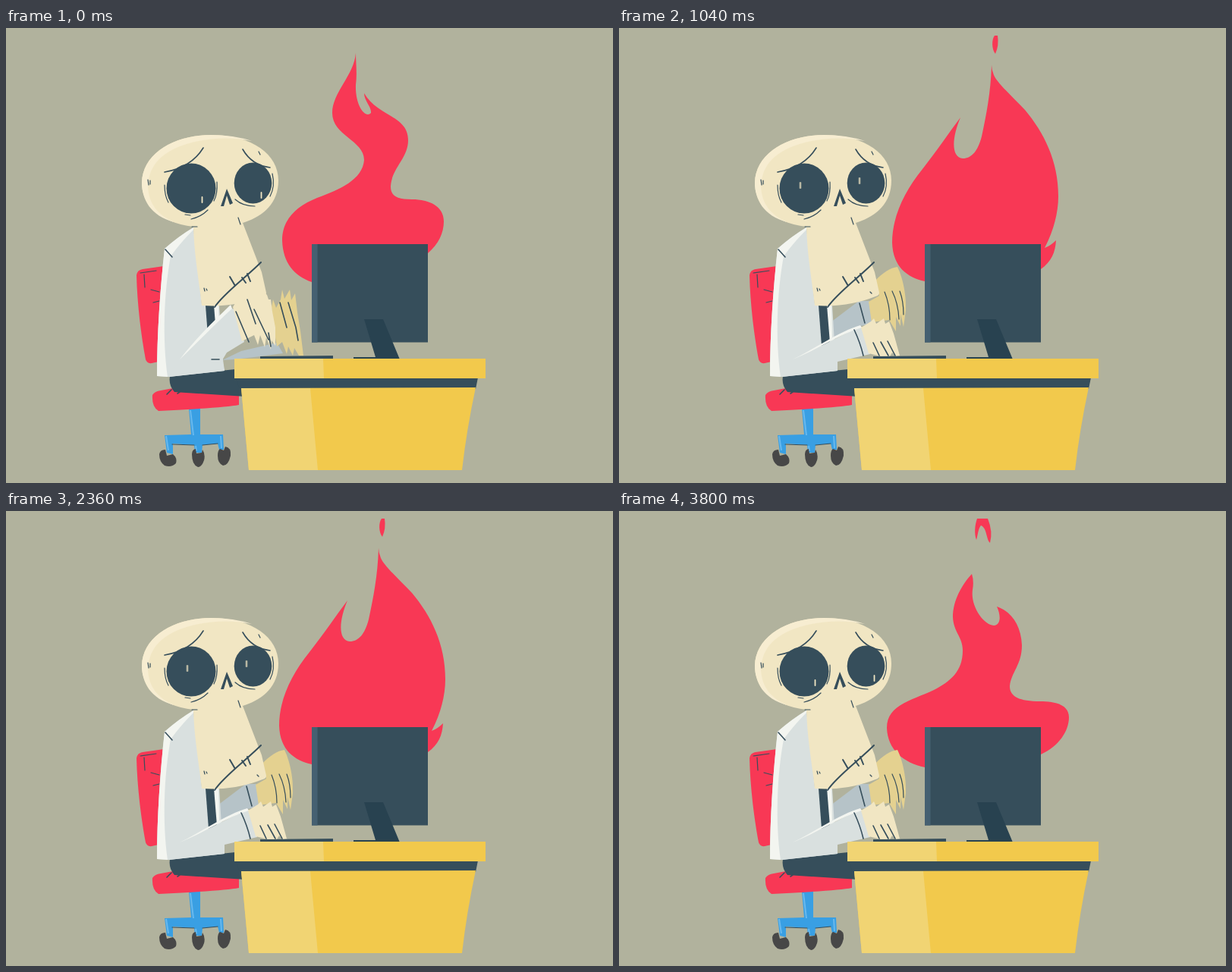
An HTML page for the animation above (3840 ms loop, 800x600 px).

```html
<!DOCTYPE html>
<html lang="en">
<head>
<meta charset="utf-8">
<title>Desk on fire</title>
<style>
  html, body { margin: 0; width: 100%; height: 100%; overflow: hidden; background: #b1b29d; }
  svg { display: block; width: 800px; height: 600px; }

  .red { fill: #f83855; }
  .dark { fill: #364e5b; }
  .bone { fill: #f1e6c3; }
  .far { fill: #e4d190; }
  .coat { fill: #d9e0df; }
  .edge { fill: #f3f5f0; }
  .shade { fill: #b6c3c8; }
  .gold { fill: #f2c94c; }
  .pale { fill: #f1d473; }
  .ink { fill: none; stroke: #364e5b; stroke-width: 1.6; stroke-linecap: round; stroke-linejoin: round; }
  .thin { stroke-width: 1.2; }
  .bold { stroke-width: 2; }

  /* Each pose shows for its share of the cycle; --i is its turn. */
  .flame > g, .arms > g { visibility: hidden; }
  .flame > g { animation: flame 640ms step-end infinite; animation-delay: calc(var(--i) * 80ms - 641ms); }
  .arms > g { animation: type 120ms step-end infinite; animation-delay: calc(var(--i) * 40ms - 121ms); }
  .glint { stroke: #f1e6c3; stroke-width: 1.8; stroke-linecap: round; animation: look 3840ms step-end -1ms infinite; }

  @keyframes flame { 0% { visibility: visible; } 12.5%, 100% { visibility: hidden; } }
  @keyframes type { 0% { visibility: visible; } 33.333%, 100% { visibility: hidden; } }
  @keyframes look {
    0%, 81.25%, 100% { transform: none; }
    20.833% { transform: translate(-19.5px, -19px); }
  }
</style>
</head>
<body>
<svg viewBox="0 0 800 600">
  <defs>
    <clipPath id="top"><rect y="10" width="800" height="400"/></clipPath>
    <g id="farHand">
      <path class="far" d="M337 334C347 323 358 316 367 315C373 327 379 350 378 372L375 394L371 377L371 393L365 381L365 400L356 385L333 388L329 361L343 353Z"/>
      <path class="ink thin" d="M350 348Q357 365 357 385M360 347Q368 363 369 384M370 347Q375 360 375 378"/>
    </g>
    <g id="nearHand">
      <path class="bone" d="M319 395L332 387L336 383L339 390L349 383L351 390L356 387L362 403L370 432L365 433L360 428L357 433L345 433L329 429Z"/>
      <path class="ink" d="M335 415L343 432M345 414L355 432M354 413L364 432"/>
    </g>
    <g id="raisedSleeve">
      <path class="coat" d="M224 441L295 369L304 372L314 414L291 428L285 438L288 452L215 460Z"/>
      <path class="edge" d="M229 437C248 412 272 388 296 365L298 370C277 389 250 417 229 437Z"/>
      <path class="ink" d="M271 437H281"/>
    </g>
  </defs>

  <g class="flame red" clip-path="url(#top)">
    <g style="--i:0">
      <path d="M461 33C459 62 430 85 430 112C430 142 472 148 472 174C470 200 440 213 410 224C383 235 364 252 364 280C365 310 380 327 403 335L556 297C570 285 577 270 577 255C577 235 558 226 535 226C516 226 507 222 507 209C508 185 530 172 530 148C530 115 490 117 472 86C472 96 482 104 481 112C474 120 460 103 461 75C463 60 461 45 461 33Z"/>
    </g>
    <g style="--i:1">
      <path d="M480 22C480 50 452 72 452 98C453 120 470 130 466 148C460 172 420 190 400 214C378 235 370 258 371 282C373 308 385 322 403 330L556 312C573 298 582 278 580 258C577 225 540 215 532 190C528 165 548 150 547 120C545 90 505 85 490 62C492 75 499 84 496 91C487 97 477 75 480 22Z"/>
    </g>
    <g style="--i:2">
      <path d="M512 14C514 45 480 62 476 92C474 122 446 142 424 168C396 196 390 222 388 250C376 262 372 295 403 322L556 318C577 302 586 275 585 245C582 222 566 205 560 186C555 203 552 214 549 214C543 205 560 170 561 140C561 110 540 92 524 62C522 75 528 84 522 88C510 86 510 60 512 14Z"/>
    </g>
    <g style="--i:3">
      <path d="M525 17C530 35 526 50 519 60Q514 67 513 76C507 70 506 60 510 49C515 38 524 32 525 17Z"/>
      <path d="M498 76C500 96 510 108 519 107C535 103 538 88 530 78C548 82 567 99 567 125C566 160 546 188 542 208C540 226 542 231 546 231C558 215 558 190 567 152C573 175 587 215 587 252C587 285 572 310 556 321L403 313C386 297 381 275 381 262C381 250 384 240 385 232C388 246 392 254 396 257C402 250 398 222 399 209C402 165 470 155 488 105Q497 90 498 76Z"/>
    </g>
    <g style="--i:4">
      <circle cx="510.500" cy="11" r="1.200"/>
      <path d="M498 33C499 68 489 98 468 120C447 145 446 180 430 190C412 202 410 182 420 157C407 177 392 200 384 224C370 262 378 300 403 320H556C573 305 581 270 581 235C580 185 569 140 545 100C550 125 551 145 543 166C536 182 528 181 529 168C535 142 536 120 534 103C529 68 503 55 498 33Z"/>
    </g>
    <g style="--i:5">
      <path d="M495 10H499Q501 23 496 34C491 28 491 15 495 10Z"/>
      <path d="M491 49C490 85 484 115 478 143C473 162 465 172 453 172C437 170 439 144 450 118C435 138 418 163 400 186C375 217 360 250 360 283C361 315 380 329 403 334L556 318C570 308 575 296 576 280Q569 287 561 290C573 267 579 243 579 222C579 175 560 138 535 108C518 90 498 72 494 62Q491 55 491 49Z"/>
    </g>
    <g style="--i:6">
      <path d="M486 12C497 30 505 48 500 74C493 62 483 62 477 70C474 52 484 35 486 12Z"/>
      <path d="M455 104C440 125 425 150 428 175C431 205 400 225 380 240C358 258 354 275 354 292C358 318 380 332 403 336L556 322C595 312 616 290 616 268C605 275 590 272 572 262C550 252 545 240 549 215C555 170 530 130 500 108C497 130 492 160 476 163C460 163 452 130 455 104Z"/>
    </g>
    <g style="--i:7">
      <path d="M472 10H486Q493 27 489 42C484 38 485 22 477 19C473 24 473 32 471 38C468 30 469 18 472 10Z"/>
      <path d="M465 83C452 97 440 118 440 140C441 160 453 166 453 184C453 212 436 225 415 236C385 250 353 256 353 286C354 315 375 332 403 338L556 321C580 310 593 290 593 272C593 254 572 251 555 251C528 251 515 245 515 231C517 212 531 203 531 177C530 150 516 132 498 126C503 137 504 150 494 151C480 150 463 125 466 104Q468 92 465 83Z"/>
    </g>
  </g>

  <!-- monitor -->
  <rect class="dark" x="403" y="285" width="153" height="129.500"/>
  <rect x="403" y="285" width="7.500" height="129.500" fill="#456071"/>

  <!-- chair -->
  <path class="red" d="M208 314L180 318Q173 319 172 326C173 365 178 405 184 437Q186 443 192 442L201 440Z"/>
  <path class="ink thin" d="M177 323L198 320M182 325L183 342M191 345L202 348M194 362L202 360"/>
  <path fill="#399fe3" d="M241 502H256V536H286L287 556H281L279 548L259 550L258 560H249L248 550L220 548L220 562L212 560L209 537L244 536Z"/>
  <path fill="none" stroke="#68b9ee" stroke-width="2" d="M243 504L247 537M211 538L214 557M250 551L251 558M283 538L284 554"/>
  <path class="ink thin" d="M219 549L248 550M259 550L279 548"/>
  <g fill="#474747">
    <path d="M202 562Q203 556 210 556L212 564L220 562Q226 567 224 574Q218 580 209 577Q202 572 202 562Z"/>
    <path d="M245 562Q245 556 250 555L251 561L258 560L259 556Q263 562 261 570Q258 579 253 579Q245 576 245 562Z"/>
    <path d="M279 564Q279 557 282 555L287 557L289 552Q297 553 296 564Q293 577 286 577Q279 574 279 564Z"/>
  </g>
  <path class="red" d="M204 478L220 475L307 485V497Q285 501 201 505Q192 500 193 484Q196 479 204 478Z"/>
  <path class="dark" d="M216 459L302 450L316 452V486L222 480Q214 471 216 459Z"/>
  <path class="ink" d="M212 483L218 477M226 482L229 480"/>

  <!-- far arm -->
  <g class="arms">
    <g style="--i:0">
      <path class="shade" d="M285 438L310 426L357 415L365 429L335 433L301 437Z"/>
      <path class="far" d="M350 368L352 358L356 369L362 358L364 345L367 357L374 345L376 359L381 350L384 375L388 400L392 432H386L380 422L378 432L372 420L370 430L364 414L357 420L352 390Z"/>
      <path class="ink" d="M361 362L370 395M372 362L382 395L385 412"/>
    </g>
    <g style="--i:1">
      <path class="shade" d="M285 438L312 420L352 406L360 424L335 433L301 437Z"/>
      <use href="#farHand" x="10" y="37"/>
    </g>
    <g style="--i:2">
      <path class="shade" d="M279 388L316 360L330 360L334 390L318 393L280 411Z"/>
      <use href="#farHand"/>
      <path class="ink" d="M317 363L324 389"/>
    </g>
  </g>

  <!-- coat and tie -->
  <path class="coat" d="M247 263Q227 275 209 291C203 345 199 405 199 459L215 460L288 452L285 430L281 366L258 364Z"/>
  <path class="edge" d="M247 263Q227 275 209 291C203 345 199 405 199 459L213 460C206 410 208 350 217 301Q230 283 247 266Z"/>
  <path class="edge" d="M274 366H280L281 408L277 412Z"/>
  <path class="dark" d="M263 366H274L278 415L267 419Z"/>
  <path class="ink" d="M210 292L219 302"/>

  <!-- skull -->
  <path class="bone" d="M247 262C205 257 179 235 179 204C180 165 222 141 270 141C325 141 359 167 359 201C359 232 338 249 312 257L337 322L343 349Q343 353 338 354C315 363 290 368 258 366C254 330 248 300 247 262Z"/>
  <path fill="#f7edd1" d="M222 256C190 248 179 225 179 204C180 165 222 141 270 141Q300 141 324 149C294 143 264 145 238 153C200 165 188 185 187 210Q189 243 222 256Z"/>
  <ellipse class="dark" cx="244" cy="211.500" rx="32.500" ry="33"/>
  <ellipse class="dark" cx="325.500" cy="204.500" rx="24.800" ry="27"/>
  <path class="glint" d="M258.500 223V230M336.500 217V224"/>
  <path class="dark" d="M283 235L291 212L299 231L295 233L291 221L287 235Z"/>
  <path class="ink" d="M209 190Q244 184 260 158M312 160Q324 181 348 184"/>
  <path class="ink thin" d="M209 207Q209 221 214 230M278 203Q279 219 274 228M244 252Q257 249 266 240M236 246L243 247M302 226Q312 235 328 235M351 192Q355 209 348 222M187 200L188 207M190 201V206M333 163L335 167M306 250L309 259M245 262H252M261 343L262 347M264 344L265 346M331 348L333 350"/>
  <path class="ink bold" d="M275 368C287 350 315 330 336 309M295 328L302 340M311 329L316 336M318 324L322 334"/>

  <!-- near arm -->
  <g class="arms">
    <g style="--i:0">
      <use href="#raisedSleeve"/>
      <path class="bone" d="M299 368L315 341L330 338L344 352L346 358L349 358L351 374L355 395V419L350 412L349 424L343 408L341 421L335 405L332 418L327 405L311 413Z"/>
      <path class="ink" d="M303 374L320 414M318 358L329 390M327 371L346 411M346 402L349 420"/>
    </g>
    <g style="--i:1">
      <use href="#raisedSleeve"/>
      <use href="#nearHand" x="-15" y="-25"/>
    </g>
    <g style="--i:2">
      <path class="coat" d="M224 441L318 393L325 399L331 430L288 440V452L215 460Z"/>
      <path class="edge" d="M229 437C255 425 290 400 318 392L320 395C290 404 262 424 229 437Z"/>
      <path class="ink" d="M310 398Q318 415 322 432"/>
      <use href="#nearHand"/>
    </g>
  </g>

  <!-- desk -->
  <path class="dark" d="M335 433L431 432V437H335ZM302 461H622L619 476H308Z"/>
  <path fill="#284250" d="M472 384H497L519 437H458V434H487Z"/>
  <path class="gold" d="M301 436H632V462H301ZM310 475L619 474Q607 530 601 583H320Z"/>
  <path class="pale" d="M301 436H418L419 462H301ZM310 475H401L411 583H320Z"/>
</svg>
</body>
</html>
```
